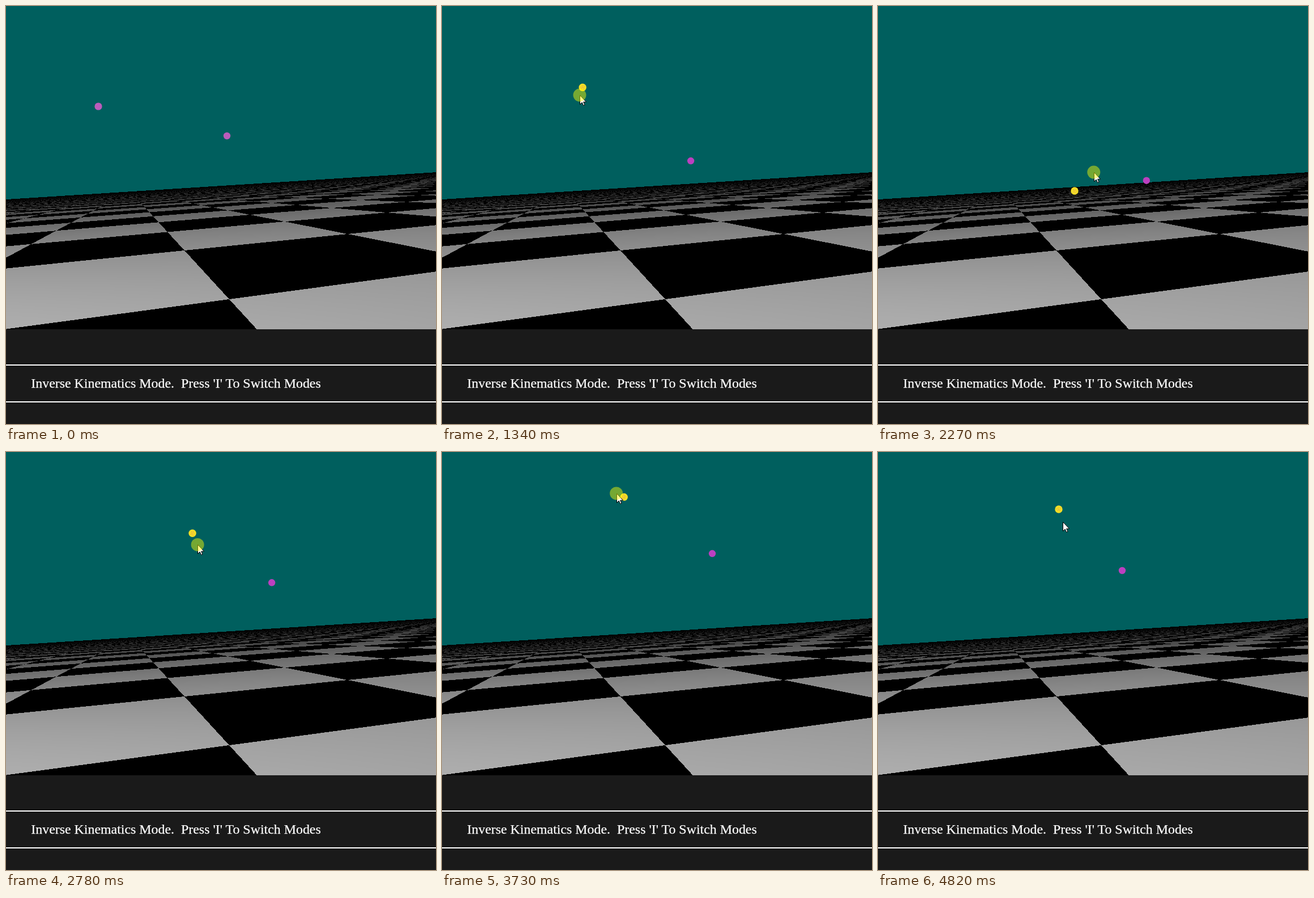
An HTML page with a canvas that plays this animation: 759x737 px, repeating every 4.84 s.

```html
<!DOCTYPE html>
<html lang="en">
<head>
<meta charset="utf-8">
<title>Inverse kinematics</title>
<style>
html, body { margin: 0; width: 100%; height: 100%; overflow: hidden; background: #1a1a1a; }
canvas { position: absolute; left: 0; top: 0; display: block; }
p {
  position: absolute; left: 44.3px; top: 652px; margin: 0; white-space: pre;
  font: 23.9px/27px "Liberation Serif", serif; color: #fff;
  -webkit-text-stroke: 0.25px #fff;
}
</style>
</head>
<body>
<canvas id="stage" width="759" height="737"></canvas>
<p>Inverse Kinematics Mode.  Press 'I' To Switch Modes</p>
<script>
const W = 759, H = 737, VIEW = 570, LOOP = 4840;
const GRAB = 500, MOVE = 580, RELEASE = 4620, LAG = 35;
const ctx = document.getElementById('stage').getContext('2d');

// Turning points of the dragged hand and of the joint behind it: time, x, y
const hand = [
  [30, 206, 219], [470, 164, 170], [600, 164, 170], [940, 244, 166],
  [1120, 284, 110], [1380, 242, 175], [1600, 310, 350], [1750, 315, 420],
  [1860, 270, 454], [1970, 182, 390], [2060, 225, 290], [2170, 290, 368],
  [2400, 470, 170], [2560, 380, 96], [2710, 325, 125], [2780, 338, 163],
  [2850, 342, 190], [3080, 300, 355], [3500, 400, 165], [3730, 308, 73],
  [3850, 290, 125], [4060, 368, 310], [4190, 300, 352], [4310, 264, 282],
  [4620, 319, 101], [4820, 326, 123]
];
const elbow = [
  [580, 390, 229], [940, 380, 281], [1200, 402, 245], [1750, 545, 377],
  [2170, 479, 345], [2560, 475, 180], [2780, 469, 230], [3070, 528, 330],
  [3730, 477, 179], [4080, 559, 345], [4310, 459, 343], [4640, 431, 209]
];

// Cubic path through unevenly timed keys
function along(keys, t) {
  const last = keys.length - 1;
  t = Math.min(Math.max(t, keys[0][0]), keys[last][0]);
  let i = 0;
  while (i < last - 1 && keys[i + 1][0] <= t) i++;
  const a = keys[i], b = keys[i + 1], span = b[0] - a[0], s = (t - a[0]) / span;
  const slope = (k, c) => k === 0 || k === last ? 0 :
    (keys[k + 1][c] - keys[k - 1][c]) / (keys[k + 1][0] - keys[k - 1][0]);
  return [1, 2].map(c =>
    a[c] === b[c] ? a[c] :
    a[c] * (1 + 2 * s) * (1 - s) ** 2 + b[c] * s * s * (3 - 2 * s) +
    span * s * (1 - s) * (slope(i, c) * (1 - s) - slope(i + 1, c) * s));
}

const cross = (a, b) => [
  a[1] * b[2] - a[2] * b[1], a[2] * b[0] - a[0] * b[2], a[0] * b[1] - a[1] * b[0]];
const dot = (r, x, y) => r[0] * x + r[1] * y + r[2];

function makeScene() {
  const layer = document.createElement('canvas');
  layer.width = W;
  layer.height = H;
  const g = layer.getContext('2d');
  const image = g.createImageData(W, VIEW), px = image.data;
  // Plane given by its two vanishing points and one tile corner
  const side = [3250, 135.6, 1].map(n => n * 0.1981);
  const away = [218.7, 326.2, 1].map(n => n * 0.8206);
  const corner = [394, 517, 1];
  const uRow = cross(away, corner), vRow = cross(corner, side), wRow = cross(side, away);
  for (let y = 0, o = 0; y < VIEW; y++) {
    for (let x = 0; x < W; x++, o += 4) {
      const cx = x + 0.5, cy = y + 0.5, depth = cy - (341.1 - 0.06322 * cx);
      let color = [0, 95, 94];
      if (depth > 0) {
        const w = dot(wRow, cx, cy);
        const tile = Math.floor(dot(uRow, cx, cy) / w) + Math.floor(dot(vRow, cx, cy) / w);
        const light = 208 * depth / (depth + 45) * (1 - 0.00011 * cx);
        color = Array(3).fill(tile % 2 ? light : 0);
      }
      px.set([...color, 255], o);
    }
  }
  g.fillStyle = '#1a1a1a';
  g.fillRect(0, VIEW, W, H - VIEW);
  g.putImageData(image, 0, 0);
  g.fillStyle = '#fff';
  for (const y of [632, 697]) g.fillRect(0, y, W, 2);
  return layer;
}

function disc(x, y, r, color) {
  ctx.fillStyle = color;
  ctx.beginPath();
  ctx.arc(x, y, r, 0, Math.PI * 2);
  ctx.fill();
}

function selectedBall(x, y) {
  disc(x, y, 6.7, '#f3df25');
  for (let i = 0; i < 9; i++) {
    const r = 1.5 * Math.sqrt(i), a = i * 2.4 + Math.floor(x + y);
    disc(x + r * Math.cos(a), y + r * Math.sin(a), 0.7, '#e39a58');
  }
}

const arrow = new Path2D('M.5 .5V16.5L4.2 13L6.6 18.4L9 17.3L6.6 12.2H11.6Z');
function pointer(x, y) {
  ctx.save();
  ctx.translate(Math.round(x), Math.round(y));
  ctx.fillStyle = '#fff';
  ctx.fill(arrow);
  ctx.strokeStyle = '#000';
  ctx.stroke(arrow);
  ctx.restore();
}

const scene = makeScene();

function draw(t) {
  ctx.drawImage(scene, 0, 0);
  disc(...along(elbow, t), 6.2, t < MOVE ? '#bb5cbb' : '#bc40c0');
  const ball = t < MOVE + LAG ? [163, 177] : along(hand, Math.min(t - LAG, RELEASE));
  if (t < GRAB) disc(...ball, 6.6, '#bb5cbb');
  else selectedBall(...ball);
  if (t < hand[0][0]) return;
  const [x, y] = along(hand, t);
  pointer(x, y);
  if (t >= GRAB && t < RELEASE) disc(x, y, 11.5, 'rgba(255,255,0,.46)');
}

const start = performance.now();
function tick() {
  draw((performance.now() - start) % LOOP);
  requestAnimationFrame(tick);
}
tick();
</script>
</body>
</html>
```
